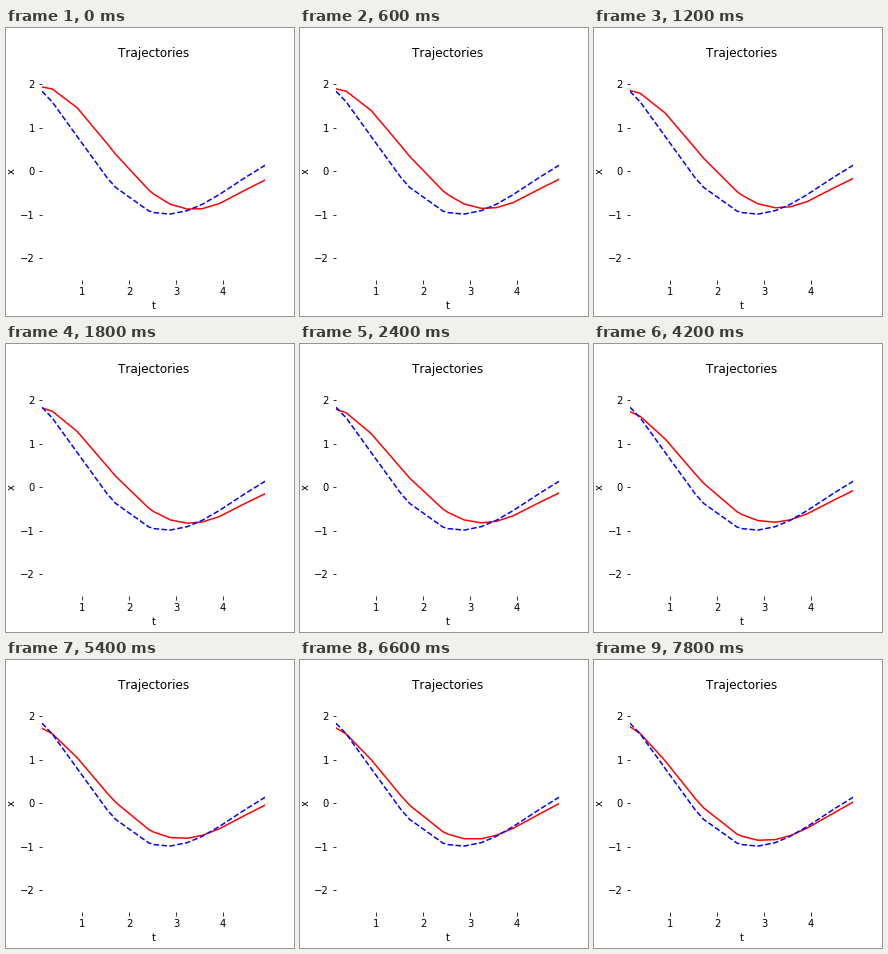
Animation, 288 px wide and 288 px high, one loop 8 s. Source, as a matplotlib script:

```python
import numpy as np
import matplotlib.pyplot as plt
from matplotlib.animation import FuncAnimation

INTERVAL = 200       # ms
FRAMES = 40
HOLD = 3             # frames per training step
LAST_STEP = (FRAMES - 1) // HOLD

# Irregular sample times; the lines are straight between them
t = np.array([0.14, 0.36, 0.89, 1.53, 1.71, 2.42, 2.53,
              2.87, 3.24, 3.56, 3.92, 4.50, 4.90])

# Heights at six knots define each smooth curve
knots = [0.14, 0.89, 1.71, 2.87, 3.92, 4.90]
still = np.array([1.84, 0.80, -0.37, -0.985, -0.535, 0.14])
start = np.array([1.94, 1.46, 0.39, -0.755, -0.745, -0.20])
end = np.array([1.76, 0.975, -0.105, -0.85, -0.57, 0.03])
bow = np.array([-0.42, -0.36, -0.12, 0.16, 0.17, 0])


def sample(heights):
    return np.polyval(np.polyfit(knots, heights, 5), t)


def trained(step):
    """Slide from start to end, bending on the way."""
    u = step / LAST_STEP
    return sample(start + (end - start) * u + bow * u * (1 - u))


plt.rcParams["text.kerning_factor"] = 6

fig, ax = plt.subplots(figsize=(4, 4), dpi=72, facecolor="white")
fig.subplots_adjust(left=0.125, right=0.9, bottom=0.125, top=0.88)

moving, = ax.plot(t, trained(0), "r-", lw=1.5)
ax.plot(t, sample(still), "b--", lw=1.5)

ax.set_title("Trajectories")
ax.set_xlabel("t")
ax.set_ylabel("x")
ax.set_xlim(t[0], t[-1])
ax.set_ylim(-2.5, 2.5)
ax.set_xticks(range(1, 5))
ax.set_yticks(range(-2, 3))
ax.spines[:].set_visible(False)


def update(frame):
    moving.set_ydata(trained(frame // HOLD))
    return moving,


anim = FuncAnimation(fig, update, frames=FRAMES, interval=INTERVAL,
                     repeat=True, repeat_delay=0)
plt.show()
```
